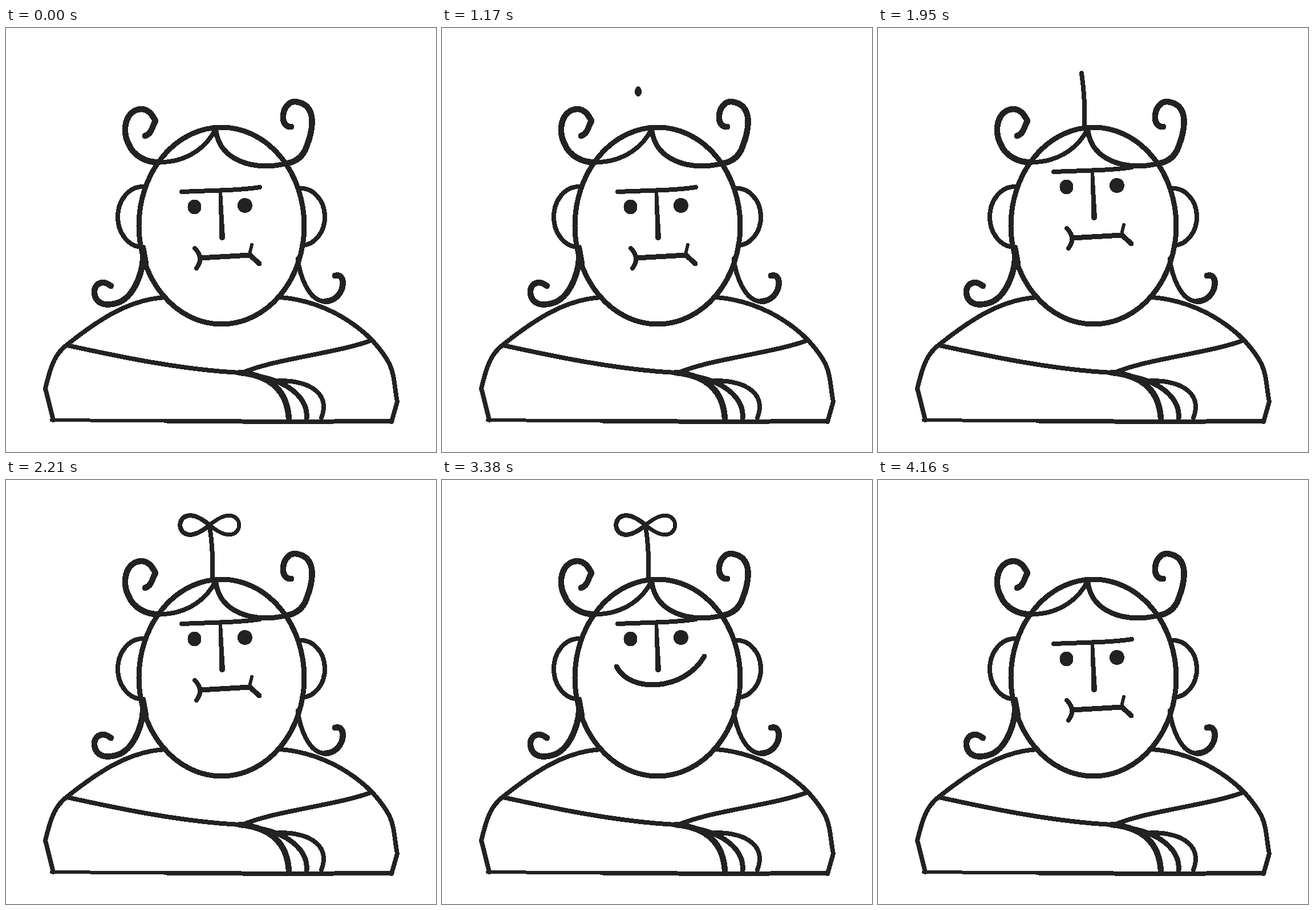
Animation of 754 by 743 pixels, one loop 4.29 s. Source, as an HTML page:

```html
<!DOCTYPE html>
<html lang="en">
<head>
<meta charset="utf-8">
<title>Sprout</title>
<style>
  html, body { margin: 0; width: 100%; height: 100%; overflow: hidden; background: #fff; }
  svg { display: block; fill: none; stroke: #222; stroke-width: 8; stroke-linecap: round; stroke-linejoin: round; }
  .thin { stroke-width: 6; }
  .bold { stroke-width: 10.5; }
  .solid { fill: #222; stroke: none; }
</style>
</head>
<body>
<svg width="754" height="743" viewBox="0 0 754 743" shape-rendering="crispEdges">
  <g id="head">
    <ellipse cx="378" cy="346.5" rx="145" ry="172.5" stroke-width="9"/>
    <path d="M240 278A44 53 0 0 0 240 384"/>
    <path d="M515 281A42 50 0 0 1 519 381"/>
  </g>
  <g id="hair">
    <path class="bold" d="M244 189C256 185 256 173 262 163Q253 143 238 142C208 143 203 182 215 203C223 224 246 236 268 235"/>
    <path d="M268 235C310 236 348 215 367 178"/>
    <path class="bold" d="M500 173C478 175 483 130 506 129C548 132 538 180 527 208C520 228 505 236 488 238"/>
    <path stroke-width="9" d="M488 238C440 250 375 235 368 180"/>
    <path class="bold" d="M184 452C164 436 148 456 158 474C167 490 190 484 200 480C225 468 244 425 240 385L245 412"/>
    <path class="bold" d="M577 434C600 428 594 478 560 479"/>
    <path d="M560 479C530 480 514 430 512 404"/>
  </g>
  <g id="body">
    <path d="M280 472C215 475 160 513 107 555C88 570 80 585 69 632L83 687"/>
    <path d="M482 472C550 478 605 510 642 547C685 595 677 605 686 655L676 690"/>
    <path class="thin" d="M80 687L480 690"/>
    <path d="M280 688.5L480 690L674 689"/>
    <path d="M107 556C155 566 290 598 410 604"/>
    <path d="M642 547C580 570 470 580 415 604"/>
    <path class="bold" d="M410 604C455 608 492 628 496 684"/>
    <path stroke-width="9" d="M440 610C500 620 530 652 527 684"/>
    <path d="M478 618C540 618 568 645 553 683"/>
  </g>
  <g id="face">
    <path d="M308 287L375 284.5Q420 283 445 279"/>
    <path class="solid" d="M373 286h6L384 367a5 5 0 0 1-10 0z"/>
    <ellipse class="solid eye" cx="330.5" cy="313.5" rx="12"/>
    <ellipse class="solid eye" cx="419" cy="311" rx="13"/>
    <g id="frown">
      <path stroke-width="9" d="M340 403L428 398L444 413"/>
      <path d="M331 386Q348 403 334 421"/>
      <path class="thin" d="M431 380L427 396"/>
    </g>
    <path id="smile" stroke-width="9"/>
  </g>
  <ellipse id="seed" class="solid" rx="6" ry="9"/>
  <g id="sprout">
    <path id="stem"/>
    <path class="leaf"/>
    <path class="leaf" stroke-width="7"/>
  </g>
</svg>
<script>
const STEP = 130, COUNT = 33;
const $ = id => document.getElementById(id);
const eyes = document.querySelectorAll('.eye');
const leaves = document.querySelectorAll('.leaf');
const clamp = (v, lo = 0, hi = 1) => Math.max(lo, Math.min(hi, v));
const ramp = (f, from, to) => clamp((f - from) / (to - from));
const mix = (a, b, k) => a.map((v, i) => v + (b[i] - v) * k);
const show = (el, on) => el.setAttribute('visibility', on ? 'visible' : 'hidden');

const shut = [366, 399, 375, 397, 385, 397, 395, 396];
const grin = [306, 362, 330, 409, 425, 405, 460, 344];

function drawFace(f) {
  const rise = ramp(f, 10, 15), fall = ramp(f, 26, 32);
  const dx = -2 * Math.sin(3 * Math.PI * rise);
  const dy = -35 * (rise ** 1.08 - fall);
  $('face').setAttribute('transform', `translate(${dx} ${dy})`);

  const open = Math.min(Math.abs(f - 3) / 3, Math.abs(f - 23) / 2);
  eyes.forEach(eye => eye.setAttribute('ry', 13 * clamp(open, 0.12)));

  const smiling = f > 20 && f < 32;
  show($('frown'), !smiling);
  show($('smile'), smiling);
  const [x, y, ...curve] = mix(shut, grin, ramp(f, 21, 24));
  $('smile').setAttribute('d', `M${x} ${y}C${curve}`);
}

function drawSeed(f) {
  const k = ramp(f, 7, 10);
  show($('seed'), f > 6 && f < 11);
  $('seed').setAttribute('cx', 308 + 54 * k);
  $('seed').setAttribute('cy', 6 + 158 * k);
}

// The stem grows, then the leaves swing from drooping (-1) through level to raised (1).
function drawSprout(f) {
  const grow = ramp(f, 12, 15) - ramp(f, 27, 29);
  const lift = f < 26 ? ramp(f, 16, 17) + ramp(f, 17, 20) - 1 : 26 - f;
  const top = 79 + 14 * clamp(lift);
  const leafy = f > 15 && f < 28;
  show($('sprout'), grow > 0);
  $('stem').setAttribute('d', `M362 174q2 ${-45 * grow} -5 ${(top - 174) * grow}`);
  leaves.forEach((leaf, i) => {
    const side = i ? 1 : -1;
    leaf.setAttribute('visibility', leafy ? 'inherit' : 'hidden');
    leaf.setAttribute('d', `M0 0C${side * 69} -58 ${side * 69} 58 0 0`);
    leaf.setAttribute('transform', `translate(357 ${top}) rotate(${-38 * side * lift})`);
  });
}

let shown = -1;
const start = performance.now();
function tick() {
  const f = Math.floor((performance.now() - start) / STEP) % COUNT;
  if (f !== shown) {
    shown = f;
    drawFace(f);
    drawSeed(f);
    drawSprout(f);
  }
  requestAnimationFrame(tick);
}
tick();
</script>
</body>
</html>
```
